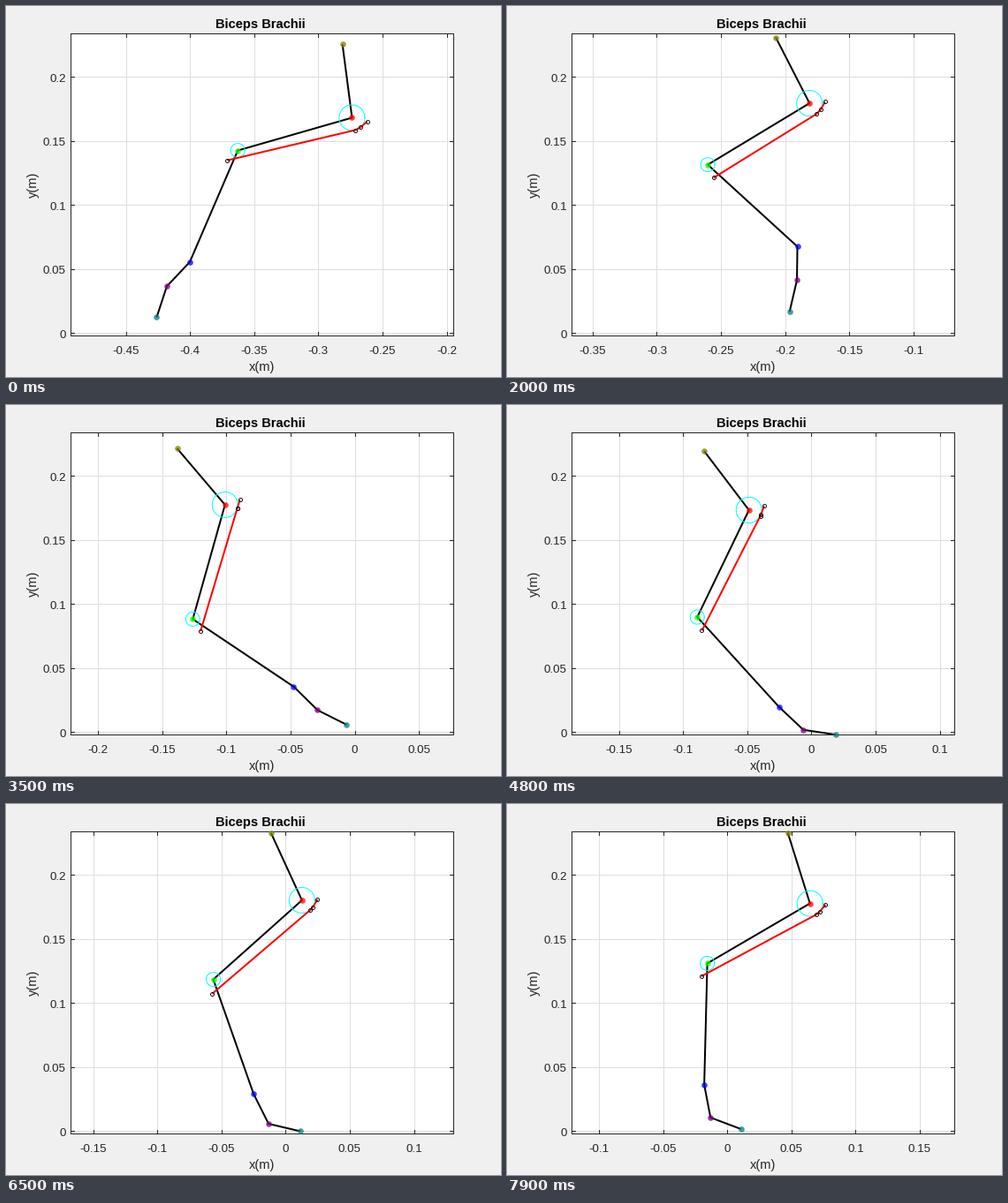
These frames come from a looping animation (560x420 px, 8 s). A matplotlib script:

```python
import numpy as np
import matplotlib.pyplot as plt
from matplotlib.animation import FuncAnimation

W, H = 560, 420
LEFT, RIGHT, TOP, BOTTOM = 73, 506, 31, 373
SCALE = 1452            # pixels per metre
ZERO_Y = 370.4          # pixel row of y = 0
FLOOR = 373.8           # lowest row the paw can reach
CYCLE = 88              # steps in one stride
STRIDE = 0.397          # metres covered by one stride
PT = 0.72               # points per pixel at 100 dpi
INK = (0.15, 0.15, 0.15)
GRID = (0.8725, 0.8725, 0.8725)

SCAPULA, UPPER, FORE, HAND, FINGER = 83.7, 134.5, 137.4, 37.85, 36.9
R_SHOULDER, R_ELBOW = 14.5, 8.0
R_ORIGIN, R_INSERT = 17.7, 16.2

JOINT_COLORS = ["olive", "red", "lime", "blue", "purple", "teal"]


def wave(step, mean, *harmonics):
    """Cyclic value: a mean plus (amplitude, phase in degrees) harmonics."""
    turn = 2 * np.pi * step / CYCLE
    return mean + sum(amp * np.cos(k * turn - np.radians(phase))
                      for k, (amp, phase) in enumerate(harmonics, 1))


def polar(r, deg):
    a = np.radians(deg)
    return np.array([r * np.cos(a), -r * np.sin(a)])


def skeleton(s):
    """Joint positions in pixels, and the scapula and forearm angles."""
    x = STRIDE * s / CYCLE + wave(s, -0.2584, (0.017, 141.3), (0.0021, 191.6))
    y = wave(s, 115, (2.2, 11.5), (7.7, 0.6), (1.9, -32.9))
    scap = wave(s, 115.6, (14.4, 155.7), (4.1, 216.6), (2.3, 140))
    upper = wave(s, 222.6, (26.9, 165.6), (9.7, 255.3), (3, 310.5))
    fore = wave(s, 293.8, (34.7, 140.6), (14.3, 178.1), (6.3, 161.2))
    hand = wave(s, 283.9, (41.3, 183.4), (16.6, 222.5), (6.6, 235.3))
    finger = wave(s, 312, (57.6, 214.8), (24.6, 245.1), (7.9, 251.2))

    shoulder = np.array([x * SCALE, y])
    bones = [shoulder + polar(SCAPULA, scap), shoulder]
    for length, angle in ((UPPER, upper), (FORE, fore),
                          (HAND, hand), (FINGER, finger)):
        bones.append(bones[-1] + polar(length, angle))
    bones = np.array(bones)
    bones[:, 1] -= max(0, bones[:, 1].max() - FLOOR)
    return bones, scap, fore


def biceps(shoulder, elbow, scap, fore):
    """Muscle path, wrapped on the shoulder circle between two tangents."""
    start = scap - 112
    insert = elbow + polar(R_INSERT, fore - 23.5)
    dx, dy = insert - shoulder
    near = start - np.degrees(np.arccos(R_SHOULDER / R_ORIGIN))
    far = np.degrees(np.arctan2(-dy, dx)
                     + np.arccos(R_SHOULDER / np.hypot(dx, dy)))
    far = (far + 180) % 360 - 180
    if far > near:
        near = far = (near + far) / 2
    return np.array([shoulder + polar(R_ORIGIN, start),
                     shoulder + polar(R_SHOULDER, near),
                     shoulder + polar(R_SHOULDER, far),
                     insert])


fig = plt.figure(figsize=(W / 100, H / 100), dpi=100, facecolor="#f0f0f0")
ax = fig.add_axes([0, 0, 1, 1])


def line(x, y, color, width, z, **kw):
    ax.plot(x, y, color=color, lw=width * PT, zorder=z, clip_on=False, **kw)


def text(x, y, s, px, **kw):
    kw = {"color": INK, "ha": "center", "va": "baseline", **kw}
    ax.text(x, y + 0.5, s, fontsize=px * PT, family="Liberation Sans", **kw)


def circle(center, r):
    a = np.linspace(0, 2 * np.pi, 73)
    line(center[0] + r * np.cos(a), center[1] + r * np.sin(a), "cyan", 1, 6)


def draw_axes(shift):
    ax.fill([LEFT, RIGHT, RIGHT, LEFT], [TOP, TOP, BOTTOM, BOTTOM], "w", zorder=0)
    step = SCALE / 20
    first = int(np.ceil((LEFT - shift) / step))
    last = int(np.floor((RIGHT - shift) / step))
    for k in range(first, last + 1):
        x = shift + k * step
        line([x, x], [TOP, BOTTOM], GRID, 1, 1)
        line([x, x], [BOTTOM, BOTTOM - 4], INK, 1, 2)
        line([x, x], [TOP, TOP + 4], INK, 1, 2)
        text(x, 393, f"{k / 20:g}", 13.33)
    for k in range(5):
        y = ZERO_Y - k * step
        line([LEFT, RIGHT], [y, y], GRID, 1, 1)
        line([LEFT, LEFT + 4], [y, y], INK, 1, 2)
        line([RIGHT, RIGHT - 4], [y, y], INK, 1, 2)
        text(68, y + 5.2, f"{k / 20:g}", 13.33, ha="right")
    line([LEFT, RIGHT, RIGHT, LEFT, LEFT],
         [TOP, TOP, BOTTOM, BOTTOM, TOP], INK, 1, 3)
    text(287.6, 25, "Biceps Brachii", 14.67, color="k", weight="bold")
    text(290, 412, "x(m)", 14.67)
    text(30.5, 202, "y(m)", 14.67, rotation=90, va="center")


def draw(frame):
    ax.clear()
    ax.set_xlim(0, W)
    ax.set_ylim(H, 0)
    ax.axis("off")

    # The first pose holds for half a second
    bones, scap, fore = skeleton(max(0, frame - 4))
    muscle = biceps(bones[1], bones[2], scap, fore)

    # The view stays centred on the extent of everything drawn
    xs = np.concatenate([bones[:, 0], muscle[:, 0],
                         bones[1, 0] + np.array([-1, 1]) * R_SHOULDER,
                         bones[2, 0] + np.array([-1, 1]) * R_ELBOW])
    shift = (LEFT + RIGHT) / 2 - (xs.min() + xs.max()) / 2
    bones[:, 0] += shift
    muscle[:, 0] += shift

    draw_axes(shift)
    line(bones[:, 0], bones[:, 1], "k", 2, 4, solid_joinstyle="round",
         solid_capstyle="butt")
    for (x, y), color in zip(bones, JOINT_COLORS):
        line([x], [y], color, 1, 5, marker="o", ms=6.6 * PT, mew=0, alpha=0.75)
    circle(bones[1], R_SHOULDER)
    circle(bones[2], R_ELBOW)
    line(muscle[:, 0], muscle[:, 1], "r", 2, 7, solid_capstyle="butt")
    line(muscle[:, 0], muscle[:, 1], "k", 1, 8, ls="none", marker="o",
         ms=4 * PT, mfc="none", mew=0.9 * PT)
    return []


anim = FuncAnimation(fig, draw, frames=80, interval=100, init_func=lambda: [],
                     repeat=True, repeat_delay=0)
plt.show()
```
